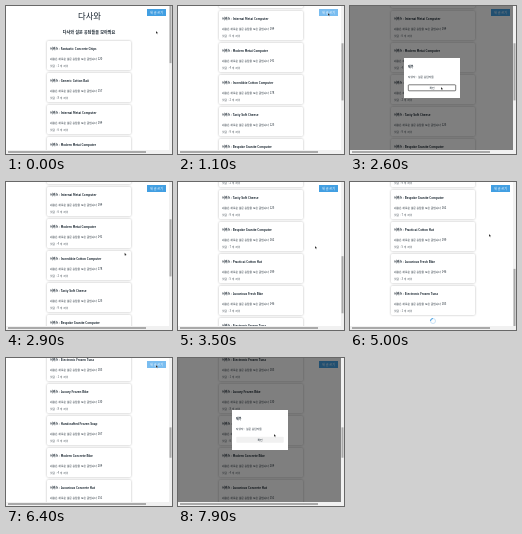
An HTML page for the animation above (8 s loop, 166x148 px).

```html
<!DOCTYPE html>
<html lang="ko">
<head>
<meta charset="utf-8">
<title>다사와</title>
<style>
  html, body { margin: 0; width: 100%; height: 100%; overflow: hidden; background: #fff; }
  svg { display: block; width: 100vw; height: 100vh; font-family: "Noto Sans CJK KR", "Noto Sans CJK", "Noto Sans", sans-serif; }
  text { fill: #14202b; }
  .mid { text-anchor: middle; }
  .card rect { fill: #fff; filter: drop-shadow(.2px .8px .8px rgba(0, 0, 0, .28)); }
  .name { font-size: 2.95px; font-weight: 700; }
  .body { font-size: 2.75px; }
  .meta { font-size: 2.8px; fill: #4a545c; }
  .thumb { fill: #a9a9a9; }
  .track { fill: #f1f1f1; }
</style>
</head>
<body>
<svg viewBox="0 0 166 148" preserveAspectRatio="none">
  <g id="page">
    <text class="mid" x="83.5" y="13.2" font-size="8.4">다사와</text>
    <text class="mid" x="83" y="27.8" font-size="4.1" font-weight="700">다사와 설문 응답들을 모아봐요</text>
    <g id="cards"></g>
    <g id="spinner" fill="none" stroke-width=".9">
      <circle r="2.5" stroke="#c3def4"/>
      <path d="M0-2.5A2.5 2.5 0 0 0-2.5 0" stroke="#3f9ce0"/>
    </g>
  </g>
  <rect id="button" x="141" y="3" width="19" height="7"/>
  <text class="mid" x="150.5" y="7.7" font-size="3.1" style="fill:#fff">새 글 쓰기</text>

  <g id="modal">
    <rect width="163" height="144" fill="#000" fill-opacity=".5"/>
    <rect x="54" y="52" width="56" height="40" fill="#fff"/>
    <text x="58" y="62" font-size="2.9" font-weight="700">제목</text>
    <text x="58" y="72" class="body">작성자 : 설문 응답자들</text>
    <rect id="confirm" x="58.3" y="78.8" width="47.4" height="6" rx=".7"/>
    <text class="mid" x="82" y="82.8" font-size="2.8">확인</text>
  </g>

  <rect class="track" x="163" width="3" height="148"/>
  <rect class="track" y="144" width="166" height="4"/>
  <rect class="thumb" id="thumb" x="163.5" width="2"/>
  <rect class="thumb" x="2" y="145" width="138" height="2"/>
  <path id="cursor" d="M0 0V2.8L.7 2.2 1.2 3.2 1.6 3 1.2 2H2Z" fill="#111" stroke="#fff" stroke-width=".2"/>
</svg>
<script>
  const $ = id => document.getElementById(id);
  const LOOP = 8000, VIEW = 144, FIRST = 35, PITCH = 32;

  const names = [
    "Fantastic Concrete Chips", "Generic Cotton Ball", "Internal Metal Computer", "Modern Metal Computer",
    "Incredible Cotton Computer", "Tasty Soft Cheese", "Bespoke Granite Computer", "Practical Cotton Hat",
    "Luxurious Fresh Bike", "Electronic Frozen Tuna", "Luxury Frozen Bike", "Handcrafted Frozen Soap",
    "Modern Concrete Bike", "Luxurious Concrete Hat", "Elegant Wooden Table", "Small Rubber Chair",
    "Recycled Steel Shoes", "Rustic Plastic Gloves", "Sleek Cotton Shirt", "Gorgeous Soft Towels"
  ];

  $("cards").innerHTML = names.map((name, i) => `
    <g class="card" transform="translate(41 ${FIRST + i * PITCH})">
      <rect width="84" height="29" rx="1.2"/>
      <text class="name" x="3" y="9.2">서비스 : ${name}</text>
      <text class="body" x="3" y="18.9">내용은 새로운 설문 응답을 모은 글입니다 ${120 + i * 37 % 90}</text>
      <text class="meta" x="3" y="25.6">댓글 : ${i * 7 % 9 + 1} 개 작성</text>
    </g>`).join("");
  const cards = [...document.querySelectorAll(".card")];

  const scrollKeys = [[0, 0], [300, 94], [3300, 94], [3500, 187], [4700, 187], [5000, 219], [5100, 219], [5400, 329]];
  const cursorKeys = [
    [0, 150, 25], [400, 150, 25], [1100, 150, 7], [1300, 150, 7], [2100, 91, 81], [2600, 91, 81],
    [3100, 137, 64], [3800, 137, 64], [4200, 80, 120], [4500, 132, 40], [4700, 139, 52],
    [5500, 139, 52], [5900, 100, 90], [6400, 150, 7], [6900, 150, 7], [7700, 96, 76]
  ];

  // Interpolates every value of a keyed track.
  function sample(keys, t) {
    const next = keys.findIndex(key => key[0] > t);
    if (next < 0) return keys[keys.length - 1].slice(1);
    const a = keys[next - 1], b = keys[next];
    const p = (t - a[0]) / (b[0] - a[0]);
    return a.slice(1).map((v, i) => v + (b[i + 1] - v) * p);
  }

  const between = (t, from, to) => t >= from && t < to;
  const show = (node, on) => node.style.display = on ? "" : "none";
  const move = (node, x, y, extra = "") => node.setAttribute("transform", `translate(${x} ${y})${extra}`);

  function draw() {
    const t = Math.floor(performance.now() % LOOP / 100) * 100;
    const [scroll] = sample(scrollKeys, t);
    const count = t > 5100 ? 20 : 10;
    const height = FIRST + count * PITCH + 8;

    move($("page"), 0, -Math.round(scroll));
    cards.forEach((card, i) => show(card, i < count));
    move($("spinner"), 83, height - 5, ` rotate(${t * .36})`);
    $("thumb").setAttribute("y", scroll * VIEW / height);
    $("thumb").setAttribute("height", VIEW * VIEW / height);

    const hover = between(t, 1000, 1200) || between(t, 6300, 6900);
    $("button").setAttribute("fill", hover ? "#7abdf0" : "#429fe2");

    show($("modal"), between(t, 1200, 2700) || t >= 6900);
    const pressed = t === 2600;
    $("confirm").setAttribute("fill", pressed ? "#fff" : "#f1f1f1");
    $("confirm").setAttribute("stroke", pressed ? "#222" : "none");
    $("confirm").setAttribute("stroke-width", ".6");

    move($("cursor"), ...sample(cursorKeys, t));
    requestAnimationFrame(draw);
  }
  draw();
</script>
</body>
</html>
```
